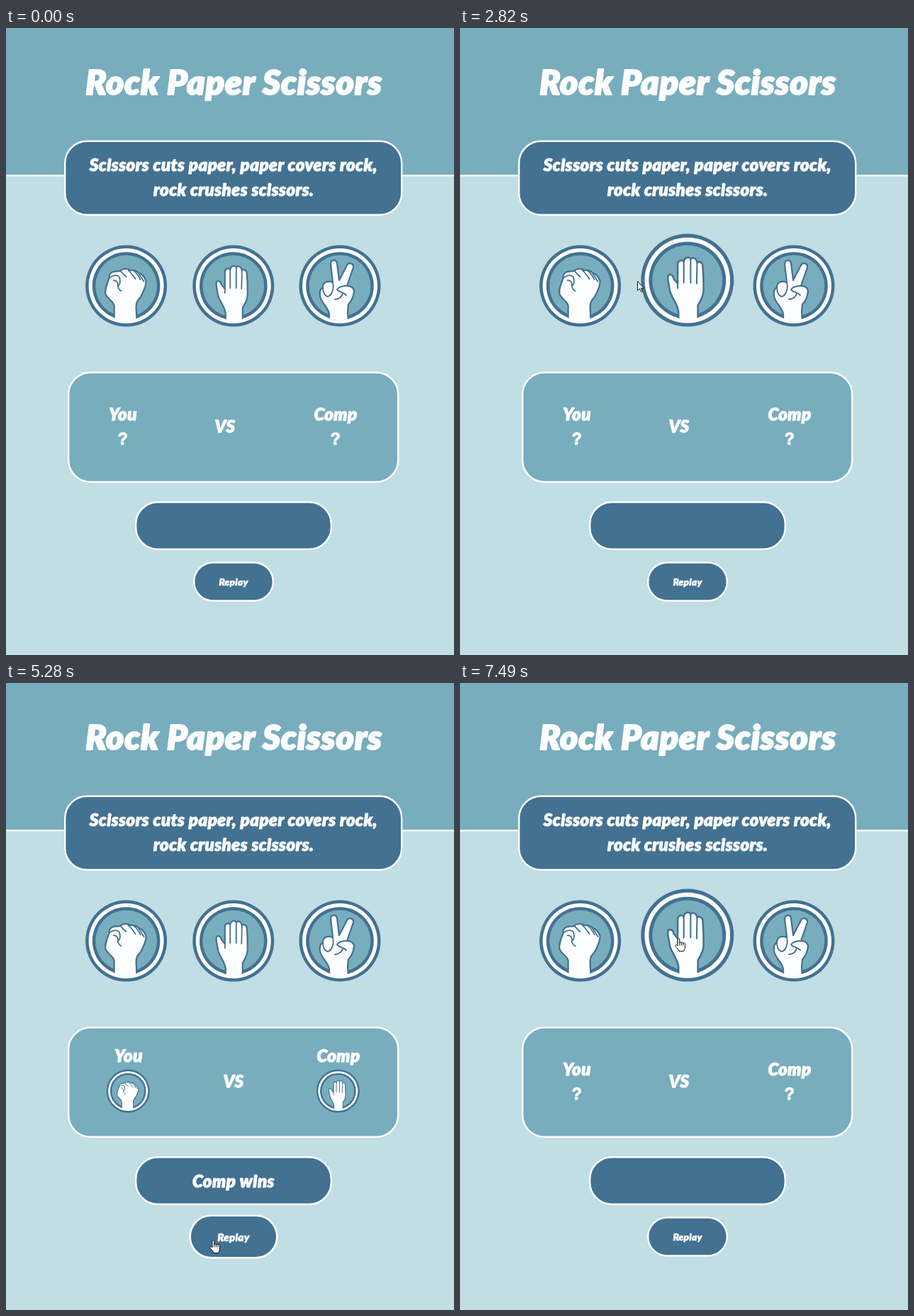
An HTML page for the animation above (8 s loop, 632 px wide and 885 px high).

```html
<!DOCTYPE html>
<html lang="en">
<head>
<meta charset="utf-8">
<title>Rock Paper Scissors</title>
<style>
  html, body { margin: 0; width: 100%; height: 100%; overflow: hidden; background: #c1dee4; }
  svg { display: block; width: 100%; height: 100%; }
  text {
    font: italic 900 24px Lato, "Open Sans", sans-serif; letter-spacing: .02em;
    fill: #fdfeff; stroke: #fdfeff; stroke-width: .045em; stroke-linejoin: round; text-anchor: middle;
  }
  .title { font-size: 48px; }
  .small { font-size: 13.6px; }
  .mark { font: bold 23px "Liberation Sans", Arial, sans-serif; }
  .panel { stroke: #fdfeff; stroke-width: 2.4; }
  .blue { fill: #437192; }
  .teal { fill: #78adbe; }
  .white { fill: #fdfeff; }
  .hand { fill: #fdfeff; stroke: #437192; stroke-width: 2.2; stroke-linejoin: round; stroke-linecap: round; }
  .line { fill: none; stroke: #437192; stroke-width: 1.8; stroke-linecap: round; stroke-linejoin: round; }
  .cursor { fill: #fff; stroke: #111; stroke-width: 1; stroke-linejoin: round; }
</style>
</head>
<body>
<svg viewBox="0 0 632 885" preserveAspectRatio="none">
  <defs>
    <clipPath id="inside"><circle r="48.3"/></clipPath>
    <g id="ring">
      <circle r="57.5" class="blue"/>
      <circle r="53" class="white"/>
      <circle r="47.8" class="blue"/>
      <circle r="43.4" class="teal"/>
    </g>
    <g id="rock">
      <use href="#ring"/>
      <g clip-path="url(#inside)">
        <path class="hand" d="M-17 52V28C-18 21-25 20-29 12C-31 5-27-3-24-11C-25-19-19-21-9-21C-5-25 2-25 6-22C11-23 15-21 18-18C23-17 26-12 28-7C28 0 24 9 20 16C15 21 14 24 14 30L15 52"/>
        <path class="line" d="M-8-21C-5-18-3-15 0-13M3-22C7-19 10-14 13-10M11-21C15-18 18-13 20-9M18-17L25-6M-23-12C-19-15-14-16-10-13M-10-13C-8-8-8-2-12 0C-11 4-10 6-7 7M-18-8C-13-8-11-4-12 0"/>
      </g>
    </g>
    <g id="paper">
      <use href="#ring"/>
      <g clip-path="url(#inside)">
        <path class="hand" d="M-11 52V40C-11 30-20 22-22 12C-23 4-25-1-24-5C-23-8-18-8-17-2L-12 4V-20C-12-25-6-26-4.500-23C-4-29 3-30 4-26C6-29 11-28 12-22C14-24 19-23 19-17C20-6 20 4 20 12C20 20 16 26 13 31V52"/>
        <path class="line" d="M-4.500-23V3M4-26V3M12-22L11.500 4M-12 4V10"/>
      </g>
    </g>
    <g id="scissors">
      <use href="#ring"/>
      <g clip-path="url(#inside)">
        <path class="hand" d="M-15 52V40C-16 30-27 24-28 14C-29 8-27 4-24 2C-24-5-18-8-10-5L-13-31C-13-37-5-38-4-32L-1-8L10-29C12-34 20-32 19-26L10 0C16 0 20 3 20 8C19 16 16 22 12 26L11 36L12 52"/>
        <path class="line" d="M-10-5C-8 2-10 8-13 13M-24 2C-24 8-22 13-18 15C-16 15-14 14-13 12M10 0C4 0-1 1-4 5C-2 9 4 8 9 13M4 10C3 16-2 19-7 19"/>
      </g>
    </g>
  </defs>

  <rect width="632" height="885" fill="#c1dee4"/>
  <rect width="632" height="208" class="teal"/>
  <rect y="207" width="632" height="2.4" class="white"/>
  <text class="title" x="321.5" y="94">Rock Paper Scissors</text>

  <rect class="panel blue" x="83.2" y="159.7" width="475" height="104" rx="31"/>
  <text x="320.8" y="202">Scissors cuts paper, paper covers rock,</text>
  <text x="321.2" y="236.5">rock crushes scissors.</text>

  <use id="rockBtn" href="#rock"/>
  <use id="paperBtn" href="#paper"/>
  <use href="#scissors" transform="translate(471 364)"/>

  <rect class="panel teal" x="88.2" y="486.2" width="465" height="154.6" rx="31"/>
  <g id="waiting">
    <text x="165" y="554">You</text>
    <text class="mark" x="165" y="588">?</text>
    <text x="309" y="571">VS</text>
    <text x="465" y="554">Comp</text>
    <text class="mark" x="465" y="588">?</text>
  </g>
  <rect class="panel blue" x="183.2" y="669.2" width="275.6" height="66.6" rx="31"/>
  <g id="result">
    <text x="173" y="535">You</text>
    <use href="#rock" transform="translate(172.2 576) scale(.53)"/>
    <text x="321" y="571">VS</text>
    <text x="469" y="535">Comp</text>
    <use href="#paper" transform="translate(468.4 576) scale(.53)"/>
    <text x="321" y="712">Comp wins</text>
  </g>

  <g id="replay">
    <rect class="panel blue" x="-55.8" y="-27" width="111.6" height="54" rx="27"/>
    <text class="small" y="5.5">Replay</text>
  </g>

  <use id="ghost" href="#paper" transform="translate(328 372.7) scale(1.139)" opacity=".6"/>
  <circle id="click" r="12" fill="#ffff28" opacity=".65"/>
  <path id="arrow" class="cursor" d="M.5.5V13.6L3.5 10.8L5.5 15.3L7.4 14.5L5.5 10.2H9.5Z"/>
  <path id="hand" class="cursor" d="M4 11V2A1.4 1.4 0 0 1 6.8 2V7A1.3 1.3 0 0 1 9.4 7.2A1.3 1.3 0 0 1 12 7.8A1.2 1.2 0 0 1 14.5 8.8V13C14.5 15 13 16 13 18.5H6C6 16.5 3 14.5 1 11.5C0 9.5 2 8.5 4 11ZM6.8 7V10.5M9.4 7.2V10.5M12 7.8V10.5"/>
</svg>

<script>
const LOOP = 8000;
const $ = id => document.getElementById(id);

// start time, cursor, left, top
const moves = [
  [0, "", 0, 0],
  [960, "arrow", 5, 113],
  [1180, "arrow", 47, 113],
  [1800, "arrow", 300, 263],
  [2000, "arrow", 318, 283],
  [2400, "hand", 333, 315],
  [2600, "hand", 329, 316],
  [2820, "arrow", 250, 357],
  [3020, "hand", 151, 361],
  [3220, "hand", 145, 360],
  [4460, "arrow", 231, 442],
  [4660, "arrow", 268, 583],
  [4860, "arrow", 294, 683],
  [5080, "hand", 290, 768],
  [5280, "hand", 287, 786],
  [5480, "hand", 289, 784],
  [6110, "arrow", 268, 571],
  [6300, "arrow", 258, 461],
  [6500, "hand", 300, 366],
  [6700, "hand", 296, 343],
  [7310, "hand", 303, 360]
];

// spans of time in which each state holds
const spans = {
  rock: [[3020, 4460]],
  paper: [[2400, 3020], [6500, LOOP]],
  replay: [[5080, 5680]],
  click: [[3840, 4090], [5480, 5680]],
  result: [[4090, 5680]],
  drag: [[7310, 7490]]
};

const show = (id, on) => $(id).setAttribute("visibility", on ? "visible" : "hidden");
const place = (id, x, y, scale = 1) =>
  $(id).setAttribute("transform", `translate(${x} ${y}) scale(${scale})`);

// Buttons grow upwards from a fixed bottom edge.
function button(id, x, big) {
  const scale = big ? 1.139 : 1;
  place(id, x, 421.6 - 57.5 * scale, scale);
}

function draw(t) {
  const on = name => spans[name].some(([from, to]) => t >= from && t < to);
  const [, kind, x, y] = moves.filter(m => m[0] <= t).pop();

  button("rockBtn", 169.6, on("rock"));
  button("paperBtn", 320.8, on("paper"));
  place("replay", 321, 781.5, on("replay") ? 1.1 : 1);
  show("waiting", !on("result"));
  show("result", on("result"));
  show("ghost", on("drag"));

  show("click", on("click"));
  place("click", x + 5, y);
  for (const id of ["arrow", "hand"]) {
    show(id, id === kind);
    place(id, x, y);
  }
}

const start = performance.now();
function tick() {
  draw((performance.now() - start) % LOOP);
  requestAnimationFrame(tick);
}
tick();
</script>
</body>
</html>
```
